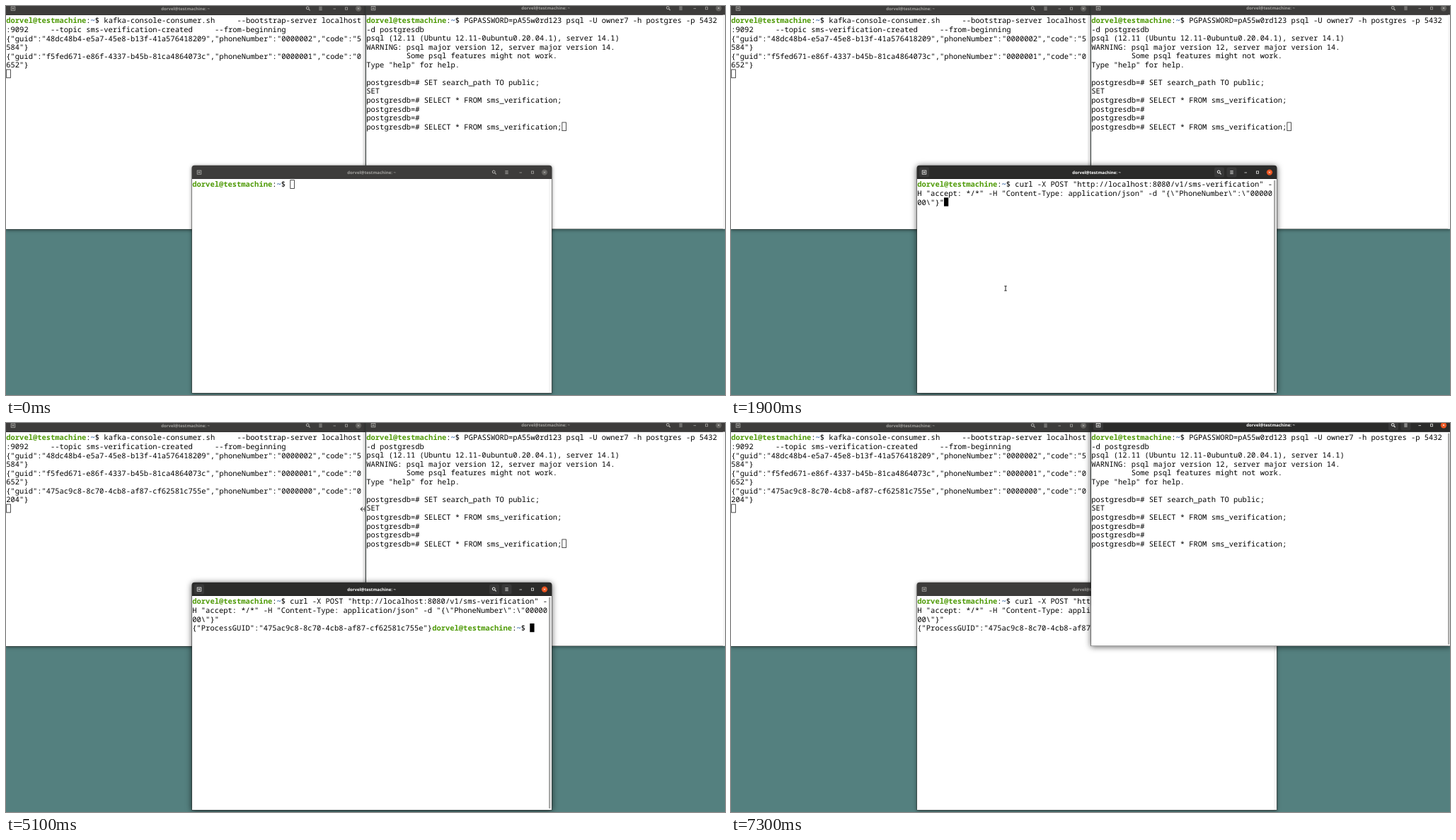
Animation, 1016 px wide and 551 px high, one loop 8000 ms. Source, as an HTML page with a canvas:

```html
<!DOCTYPE html>
<html lang="en">
<head>
<meta charset="utf-8">
<title>Terminals</title>
<style>
html, body { margin: 0; width: 100%; height: 100%; overflow: hidden; background: #54807f; }
canvas { display: block; }
</style>
</head>
<body>
<canvas id="stage" width="1016" height="551"></canvas>
<script>
const ctx = document.getElementById('stage').getContext('2d');
const LOOP = 8000;
const CELL = 6.276, ROW = 12.55, COLS = 80;
const WIDTH = 508, HEIGHT = 322, BAR = 19;
const MONO = '10.46px "Noto Sans Mono", "DejaVu Sans Mono", monospace';
const SANS = 'bold 6px "Open Sans", "Noto Sans", sans-serif';
const USER = 'dorvel@testmachine';
const PROMPT = USER + ':~$ ';

const left = { x: 0, y: -6 };
const right = { x: 509, y: -6.4 };
const center = { x: 263, y: 226 };

const event = (guid, phone, code) =>
  `{"guid":"${guid}","phoneNumber":"${phone}","code":"${code}"}`;

const NEW_GUID = '475ac9c8-8c70-4cb8-af87-cf62581c755e';
const consumerLines = [
  PROMPT + 'kafka-console-consumer.sh     --bootstrap-server localhost:9092' +
    '     --topic sms-verification-created     --from-beginning',
  event('48dc48b4-e5a7-45e8-b13f-41a576418209', '0000002', '5584'),
  event('f5fed671-e86f-4337-b45b-81ca4864073c', '0000001', '0652')
];
const newEvent = event(NEW_GUID, '0000000', '0204');

const DB = 'postgresdb=# ';
const QUERY = DB + 'SELECT * FROM sms_verification;';
const psqlLines = [
  PROMPT + 'PGPASSWORD=pA55w0rd123 psql -U owner7 -h postgres -p 5432 -d postgresdb',
  'psql (12.11 (Ubuntu 12.11-0ubuntu0.20.04.1), server 14.1)',
  'WARNING: psql major version 12, server major version 14.',
  '         Some psql features might not work.',
  'Type "help" for help.',
  '',
  DB + 'SET search_path TO public;',
  'SET',
  QUERY, DB, DB, QUERY
];

const command = PROMPT + 'curl -X POST "http://localhost:8080/v1/sms-verification" ' +
  '-H "accept: */*" -H "Content-Type: application/json" ' +
  '-d "{\\"PhoneNumber\\":\\"0000000\\"}"';
const response = `{"ProcessGUID":"${NEW_GUID}"}${PROMPT}`;

function shellLines(t) {
  if (t < 1700) return [PROMPT];
  if (t < 2600) return [command];
  return [command, t < 2800 ? '' : response];
}

function wrap(lines) {
  return lines.flatMap(line => {
    const rows = [];
    do {
      rows.push(line.slice(0, COLS));
      line = line.slice(COLS);
    } while (line);
    return rows;
  });
}

function fillRect(x, y, w, h, color) {
  ctx.fillStyle = color;
  ctx.fillRect(x, y, w, h);
}

function line(color, width, ...points) {
  ctx.strokeStyle = color;
  ctx.lineWidth = width;
  ctx.beginPath();
  for (let i = 0; i < points.length; i += 4) {
    ctx.moveTo(points[i], points[i + 1]);
    ctx.lineTo(points[i + 2], points[i + 3]);
  }
  ctx.stroke();
}

function disc(x, y, r) {
  ctx.beginPath();
  ctx.arc(x, y, r, 0, Math.PI * 2);
}

function button(x, y) {
  ctx.fillStyle = '#383838';
  ctx.beginPath();
  ctx.roundRect(x - 7, y - 7, 14, 14, 2.5);
  ctx.fill();
}

function titleBar(win, focused) {
  const { x } = win, y = win.y + 9.6;
  const ink = focused ? '#f4f4f2' : '#b5b4b1';
  const faint = focused ? '#e4e4e2' : '#a3a29f';

  fillRect(x, win.y + BAR - 0.8, WIDTH, 0.8, focused ? '#1b1b1b' : '#343332');
  if (focused) [10, 427, 444.5].forEach(dx => button(x + dx, y));

  ctx.strokeStyle = ink;
  ctx.lineWidth = 0.8;
  ctx.strokeRect(x + 7.2, y - 2.6, 5.6, 5.2);
  line(ink, 0.8, x + 8.4, y, x + 11.6, y, x + 10, y - 1.6, x + 10, y + 1.6);

  ctx.lineWidth = 1;
  disc(x + 426.2, y - 0.7, 1.9);
  ctx.stroke();
  line(ink, 1.2, x + 427.6, y + 0.8, x + 429.6, y + 2.8);

  for (const dy of [-1.9, 0, 1.9]) line(ink, 0.8, x + 442.3, y + dy, x + 446.7, y + dy);
  line(faint, 0.8, x + 462.5, y + 0.4, x + 466, y + 0.4);
  ctx.strokeRect(x + 479.4, y - 1.6, 3.2, 3.2);

  ctx.fillStyle = focused ? '#e95420' : '#62615e';
  disc(x + 498, y, 4.2);
  ctx.fill();
  const cx = x + 498, d = 1.2;
  line(focused ? '#ffffff' : '#c8c7c4', 0.8,
    cx - d, y - d, cx + d, y + d, cx - d, y + d, cx + d, y - d);

  ctx.font = SANS;
  ctx.textAlign = 'center';
  ctx.fillStyle = focused ? '#ffffff' : '#a3a29f';
  ctx.fillText(USER + ': ~', x + 253.6, y + 2);
  ctx.textAlign = 'left';
}

function drawRow(text, x, y) {
  const put = (part, col, color, bold) => {
    ctx.font = (bold ? 'bold ' : '') + MONO;
    ctx.fillStyle = color;
    ctx.fillText(part, x + col * CELL, y);
  };
  const at = text.indexOf(PROMPT);
  if (at < 0) return put(text, 0, '#000', false);
  const end = at + USER.length;
  put(text.slice(0, at), 0, '#000', false);
  put(USER, at, '#4e9a06', true);
  put(':', end, '#000', false);
  put('~', end + 1, '#3465a4', true);
  put(text.slice(end + 2), end + 2, '#000', false);
}

function drawCaret(x, y, focused, visible) {
  if (!focused) {
    ctx.strokeStyle = '#222';
    ctx.lineWidth = 0.8;
    ctx.strokeRect(x + 0.4, y + 0.4, CELL - 0.6, ROW - 0.8);
  } else if (visible) {
    fillRect(x, y, CELL, ROW - 0.3, '#000');
  }
}

function drawWindow(win, lines, focused, caretVisible) {
  const { x, y } = win;
  ctx.save();
  ctx.shadowColor = focused ? 'rgba(0,0,0,.65)' : 'rgba(0,0,0,.5)';
  ctx.shadowBlur = focused ? 9 : 5;
  ctx.shadowOffsetY = 1;
  ctx.fillStyle = focused ? '#2b2b2a' : '#3d3c3b';
  ctx.beginPath();
  ctx.roundRect(x - 0.5, y - 0.3, WIDTH + 1, HEIGHT + 0.8, [4, 4, 0, 0]);
  ctx.fill();
  ctx.restore();

  fillRect(x, y + BAR, WIDTH, HEIGHT - BAR, '#fff');
  titleBar(win, focused);
  if (focused) fillRect(x + 504, y + 21, 2.4, HEIGHT - 23, '#a9a9a8');
  else fillRect(x + 504, y + BAR, 4, HEIGHT - BAR, '#f6f6f6');

  const rows = wrap(lines);
  const tx = x + 0.3, ty = y + 20.3;
  rows.forEach((text, i) => drawRow(text, tx, ty + i * ROW + 10.1));
  const last = rows.length - 1;
  drawCaret(tx + rows[last].length * CELL, ty + last * ROW, focused, caretVisible);
}

function caretOn(t) {
  if (t < 1200) return true;
  if (t < 1700) return false;
  if (t < 2700) return true;
  return Math.floor((t - 2700) / 600) % 2 === 0;
}

// Pointer stops: time, x, y
const path = [
  [3900, 342, 350], [4300, 400, 250], [4900, 480, 103], [5100, 504, 122],
  [5500, 436, 97], [6000, 436, 97], [6400, 576, 132], [6800, 576, 132],
  [7200, 606, 171], [LOOP, 606, 171]
];

function pointerAt(t) {
  if (t >= 500 && t < 2600) return [388, 400];
  if (t < path[0][0]) return null;
  const step = Math.floor(t / 100) * 100;
  const i = path.findIndex(p => p[0] > step);
  const [t0, x0, y0] = path[i - 1], [t1, x1, y1] = path[i];
  const k = (step - t0) / (t1 - t0);
  return [x0 + (x1 - x0) * k, y0 + (y1 - y0) * k];
}

function drawPointer([x, y]) {
  const resizing = y < 220 && x > 500 && x < 513;
  const strokes = resizing
    ? [x + 3, y - 3.5, x + 3, y + 3.5, x - 3, y, x + 3, y, x - 3, y, x, y - 3, x - 3, y, x, y + 3]
    : [x, y - 3, x, y + 3, x - 1.7, y - 3.2, x + 1.7, y - 3.2, x - 1.7, y + 3.2, x + 1.7, y + 3.2];
  line('#fff', 2.2, ...strokes);
  line('#222', 1, ...strokes);
}

function draw(t) {
  fillRect(0, 0, 1016, 551, '#54807f');
  const rightFocused = t >= 6700;
  const centerFocused = t >= 600 && t < 6900;

  const consumer = t < 2800 ? consumerLines : [...consumerLines, newEvent];
  const drawRight = () => drawWindow(right, psqlLines, rightFocused, t < 7300);
  drawWindow(left, [...consumer, ''], false, true);
  if (!rightFocused) drawRight();
  drawWindow(center, shellLines(t), centerFocused, caretOn(t));
  if (rightFocused) drawRight();

  const pointer = pointerAt(t);
  if (pointer) drawPointer(pointer);
}

ctx.textRendering = 'geometricPrecision';
const start = performance.now();
function tick() {
  draw((performance.now() - start) % LOOP);
  requestAnimationFrame(tick);
}
tick();
</script>
</body>
</html>
```
